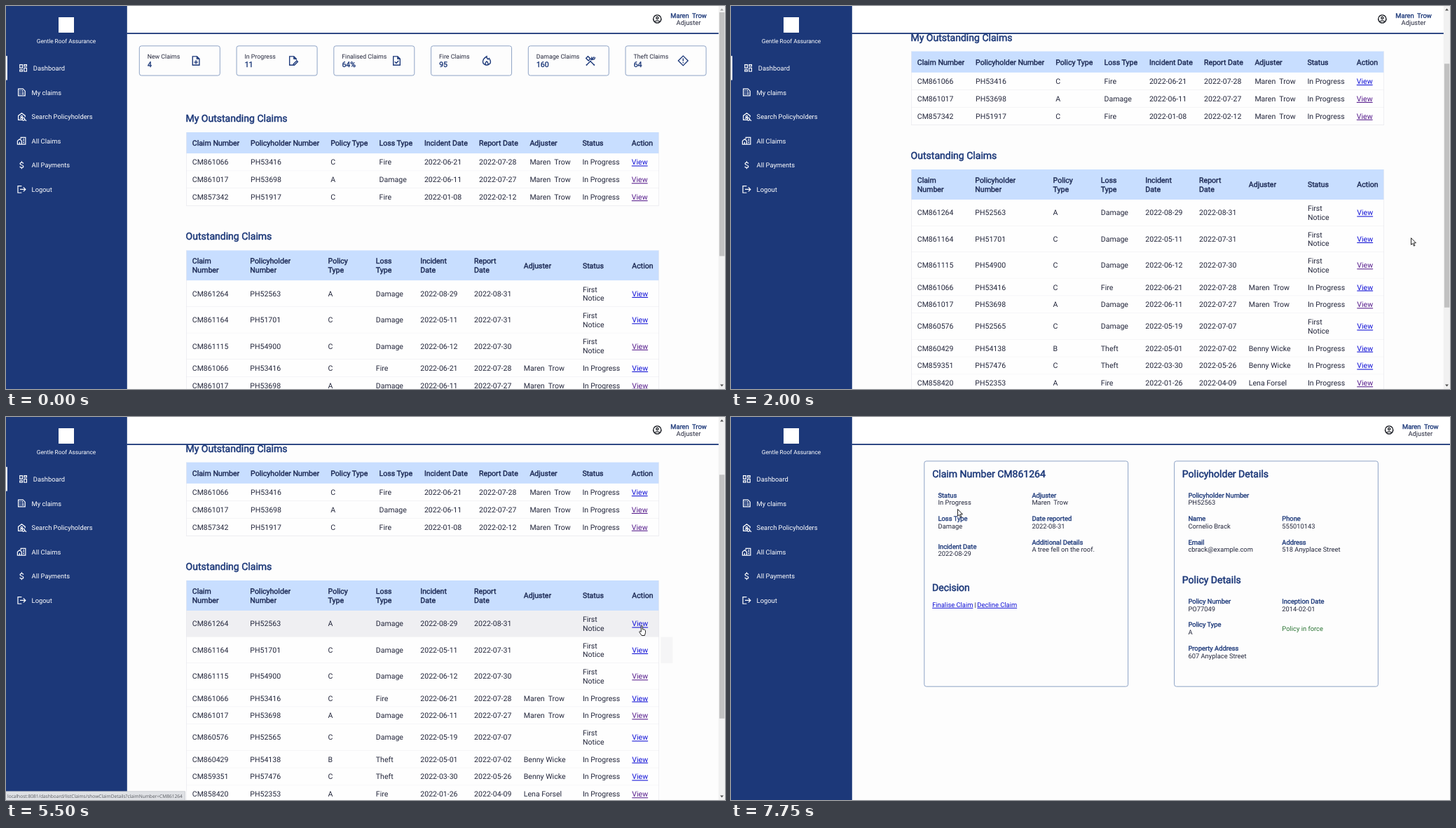
These frames come from a looping animation (1026x546 px, 8000 ms). An HTML page:

```html
<!DOCTYPE html>
<html lang="en">
<head>
<meta charset="utf-8">
<title>Claims dashboard</title>
<style>
html, body { margin: 0; width: 100%; height: 100%; overflow: hidden; background: #fdfdfd; }
svg { display: block; }
text { font-family: Roboto, sans-serif; text-rendering: geometricPrecision; white-space: pre; }
</style>
</head>
<body>
<svg id="stage" width="1026" height="546" viewBox="0 0 1026 546"></svg>
<script>
const NAVY = '#1c3879', INK = '#23263b', LINK = '#0f0fd6', SEEN = '#551a8b', EDGE = '#8fa4c6';
const SMALL = 9.36, BODY = 10.56, TITLE = 14.04;
const USER = 'Maren\u00a0 Trow';

// Text is placed by its left edge and the middle of its capitals.
function text(x, y, str, size = BODY, o = {}) {
  const fill = o.fill || INK;
  const bold = o.bold ? ` stroke="${fill}" stroke-width="${(size * .037).toFixed(2)}"` : '';
  const line = o.link ? ' text-decoration="underline"' : '';
  const anchor = o.mid ? ' text-anchor="middle"' : '';
  const font = o.font ? ` style="font-family:${o.font}"` : '';
  return `<text x="${x}" y="${(y + size * .356).toFixed(2)}" font-size="${size}" fill="${fill}"${bold}${line}${anchor}${font}>${str}</text>`;
}
const rect = (x, y, w, h, fill, extra = '') =>
  `<rect x="${x}" y="${y}" width="${w}" height="${h}" fill="${fill}" ${extra}/>`;
const frame = (x, y, w, h) => rect(x, y, w, h, '#fdfdfd', `rx="3" stroke="${EDGE}" stroke-width="1"`);
const group = (id, body) => `<g id="${id}">${body}</g>`;
// Icons use a 24-unit box centred on x, y.
const icon = (x, y, size, d, color, w = 2) =>
  `<path transform="translate(${x - size / 2} ${y - size / 2}) scale(${size / 24})" d="${d}" fill="none" stroke="${color}" stroke-width="${w}"/>`;

const SHEET = 'M14 3H5v18h14V8zM14 3v5h5';
const MENU = [
  ['Dashboard', 'M4 4h6v8H4zM14 4h6v4h-6zM14 12h6v8h-6zM4 16h6v4H4z'],
  ['My claims', 'M15 4H4v16h16V9zM7 8h2M7 12h2M7 16h2M12 8h3M12 12h5M12 16h5'],
  ['Search Policyholders', 'M14 20H4V10l8-6 8 6v3M12 10a2 2 0 1 0 .1 0M8 17q4-4 7 0M16 15a3 3 0 1 0 .1 0M19 19l4 3'],
  ['All Claims', 'M2 20V12l5-4 5 4v8zM7 20v-5M10 8V4h11v16h-9M15 8h3M15 12h3M15 16h3'],
  ['All Payments', 'M16 8.500q-.5-2.500-4-2.500t-4 2.700q0 2.300 4 3.200t4 3.400q0 2.700-4 2.700t-4-2.700M12 3v3M12 18v3'],
  ['Logout', 'M12 4H3v16h9M8 12h12M16 7l5 5-5 5']
];
const CARDS = [
  ['New Claims', '4', 80.8, SHEET + 'M8 15h8M12 11v8'],
  ['In Progress', '11', 80.4, 'M12 21H5V3h9l5 5v2M14 3v5h5M13 21v-2l7-7 2 2-7 7z'],
  ['Finalised Claims', '64%', 89.7, SHEET + 'M8 14l3 3 5-5'],
  ['Fire Claims', '95', 79.4, 'M12 3q0 5 3 6l2-2q3 4 3 7a8 7 0 0 1-16 0q0-6 8-11zM12 13q3 3 3 5a3 3 0 0 1-6 0q0-2 3-5'],
  ['Damage Claims', '160', 88.6, 'M4 21l9-9M20 21l-8-8M3 7l4-4 5 5-4 4zM14 10l6-6M15 4l-1 6 6-1 2-4M3 20l2 2M19 22l2-2'],
  ['Theft Claims', '64', 82.2, 'M12 2l10 10-10 10L2 12zM12 7v6M12 15v2']
];
const HEADS = ['Claim Number', 'Policyholder Number', 'Policy Type', 'Loss Type', 'Incident Date',
  'Report Date', 'Adjuster', 'Status', 'Action'];
const COLS1 = [265.8, 349.1, 463.2, 532.6, 596.9, 675.1, 747.4, 822.4, 892.8];
const COLS2 = [265.8, 348.3, 459.6, 527.8, 591.3, 668.1, 738.8, 822.9, 893.3];
// claim | holder | type | loss | incident | report | adjuster | link already visited
const CLAIMS = `CM861264|PH52563|A|Damage|2022-08-29|2022-08-31||
CM861164|PH51701|C|Damage|2022-05-11|2022-07-31||
CM861115|PH54900|C|Damage|2022-06-12|2022-07-30||y
CM861066|PH53416|C|Fire|2022-06-21|2022-07-28|${USER}|
CM861017|PH53698|A|Damage|2022-06-11|2022-07-27|${USER}|y
CM860576|PH52565|C|Damage|2022-05-19|2022-07-07||
CM860429|PH54138|B|Theft|2022-05-01|2022-07-02|Benny Wicke|
CM859351|PH57476|C|Theft|2022-03-30|2022-05-26|Benny Wicke|
CM858420|PH52353|A|Fire|2022-01-26|2022-04-09|Lena Forsel|y`.split('\n').map(r => r.split('|'));
const MINE = [CLAIMS[3], CLAIMS[4],
  ['CM857342', 'PH51917', 'C', 'Fire', '2022-01-08', '2022-02-12', USER, 'y']];

function twoLines(x, y, str, o) {
  const [a, b] = str.split(' ');
  return text(x, y - 6.3, a, BODY, o) + text(x, y + 6.4, b, BODY, o);
}

function table(top, headH, cols, rows, wrap) {
  const bold = { bold: true, fill: '#192650' };
  let out = rect(257, top, 674.8, headH, '#c8deff'), y = top + headH;
  HEADS.forEach((h, i) => {
    const draw = wrap && i < 6 ? twoLines : (x, yc, s, o) => text(x, yc, s, BODY, o);
    out += draw(cols[i], top + headH / 2, h, bold);
  });
  rows.forEach((r, n) => {
    const tall = !r[6], h = tall ? 37.45 : 24.83, mid = y + h / 2;
    out += rect(257, y, 674.8, h, '#fefefe', wrap ? `class="row" data-n="${n}"` : '');
    r.slice(0, 7).forEach((s, i) => { if (s) out += text(cols[i], mid, s); });
    out += tall ? twoLines(cols[7], mid, 'First Notice') : text(cols[7], mid, 'In Progress');
    out += text(cols[8], mid, 'View', BODY, { link: true, fill: r[7] ? SEEN : LINK });
    y += h;
    out += rect(257, y - .4, 674.8, .8, '#e9e9ee');
  });
  return out + rect(257, top, .7, y - top, '#e9e9ee') + rect(931.2, top, .7, y - top, '#e9e9ee');
}

function dashboard() {
  let out = '';
  CARDS.forEach(([label, value, dx, d], i) => {
    const x = 190.3 + 138.75 * i;
    out += frame(x, 56.9, 115, 42.2) + text(x + 11.4, 71.6, label, 8.78) +
      text(x + 11.6, 83.2, value, BODY, { bold: true, fill: NAVY }) + icon(x + dx, 78, 16.5, d, NAVY);
  });
  const head = { bold: true, fill: NAVY };
  return out + text(256.4, 160, 'My Outstanding Claims', TITLE, head) +
    table(180, 30.3, COLS1, MINE, false) +
    text(256.6, 328.4, 'Outstanding Claims', TITLE, head) +
    table(348.4, 43, COLS2, CLAIMS, true) +
    rect(934.3, 429, 17, 37.5, '#f5f5f6', 'id="patch"');
}

function details() {
  const title = (x, y, s) => text(x, y, s, TITLE, { bold: true, fill: NAVY });
  const field = (x, y, label, value) =>
    text(x, y, label, SMALL, { bold: true, fill: NAVY }) + text(x, y + 10.8, value, SMALL);
  const [a, b, c, d] = [295.5, 429.4, 652.4, 786.3];
  return frame(275.8, 62.9, 290.8, 321.3) + frame(632.6, 62.9, 290.8, 321.3) +
    title(287.2, 80.8, 'Claim Number CM861264') +
    field(a, 111.3, 'Status', 'In Progress') + field(b, 111.3, 'Adjuster', USER) +
    field(a, 144.9, 'Loss Type', 'Damage') + field(b, 144.9, 'Date reported', '2022-08-31') +
    field(a, 184.2, 'Incident Date', '2022-08-29') +
    field(b, 178.3, 'Additional Details', 'A tree fell on the roof.') +
    title(287, 243, 'Decision') +
    text(287.2, 267.6, 'Finalise Claim', SMALL, { link: true, fill: LINK }) +
    text(347.2, 267.6, '|', SMALL) +
    text(351.3, 267.6, 'Decline Claim', SMALL, { link: true, fill: LINK }) +
    title(643.8, 80.8, 'Policyholder Details') +
    field(c, 111.3, 'Policyholder Number', 'PH52563') +
    field(c, 144.9, 'Name', 'Cornelio Brack') + field(d, 144.9, 'Phone', '555010143') +
    field(c, 178.3, 'Email', 'cbrack@example.com') + field(d, 178.3, 'Address', '518 Anyplace Street') +
    title(643.8, 232.2, 'Policy Details') +
    field(c, 262.6, 'Policy Number', 'PO77049') + field(d, 262.6, 'Inception Date', '2014-02-01') +
    field(c, 296, 'Policy Type', 'A') + text(d, 301.6, 'Policy in force', SMALL, { fill: '#2b7434' }) +
    field(c, 329.6, 'Property Address', '607 Anyplace Street');
}

function header() {
  return rect(172.5, 0, 854, 38.2, '#fff') + rect(172.5, 38.2, 854, 1.8, NAVY) +
    group('user', icon(929.3, 18.6, 15,
      'M12 3a9 9 0 1 0 .1 0M12 7a2.500 2.500 0 1 0 .1 0M6 18q6-5 12 0', '#15181f') +
      text(974, 13.3, USER, SMALL, { bold: true, fill: NAVY, mid: true }) +
      text(974, 24, 'Adjuster', SMALL, { mid: true }));
}

function sidebar() {
  let out = rect(0, 0, 172.8, 546, NAVY) + rect(75, 16, 22, 22, '#fff') +
    text(86, 50.3, 'Gentle Roof Assurance', 8.3, { fill: '#fff', mid: true }) +
    rect(0, 71.2, 1.9, 34.4, '#fff', 'id="active"');
  MENU.forEach(([label, d], i) => {
    const y = 88.6 + 34.6 * i;
    out += group('menu' + i, icon(22.4, y - .2, 14.5, d, '#fff') +
      text(36.6, y, label, SMALL, { fill: '#fff' }));
  });
  return out;
}

const scrollbar = () => rect(1016.8, 0, 9.2, 546, '#f1f1f1') +
  rect(1017.9, 9, 7.4, 347.5, '#c1c1c1', 'id="thumb"') +
  '<path id="up" d="M1019 6.500h5l-2.500-3z"/><path d="M1019 539.500h5l-2.500 3z" fill="#505050"/>';

const status = () => rect(-1, 533.8, 256.6, 14, '#dfe1e5', 'stroke="#c3c6cb" stroke-width=".7"') +
  text(2, 540.2, 'localhost:8081/dashboard/listClaims/showClaimDetails?claimNumber=CM861264',
    6.6, { fill: '#55585d', font: "'Open Sans',sans-serif" });

const pointer = (id, d) =>
  `<path id="${id}" d="${d}" fill="#fff" stroke="#000" stroke-width=".85" stroke-linejoin="round"/>`;

const stage = document.getElementById('stage');
stage.innerHTML = rect(0, 0, 1026, 546, '#fdfdfd') +
  group('dash', dashboard()) + group('claim', details()) + header() + sidebar() +
  group('bar', scrollbar()) + group('status', status()) +
  pointer('arrow', 'M0 0V9.700L2.200 7.700 3.900 11.400 5.400 10.800 3.800 7.100H6.900z') +
  pointer('hand', 'M3 9V1.300a1 1 0 0 1 2 0V5.300l3.200.800q1 .300 1 1.400V10.500L8 14.300H3.800L.600 9.600q-.500-1 .600-1.400z');

const $ = id => document.getElementById(id);
const show = (id, on) => $(id).setAttribute('visibility', on ? 'visible' : 'hidden');
const move = (id, x, y) => $(id).setAttribute('transform', `translate(${x} ${y})`);

// Pointer stops: time, x, y
const PATH = [
  [500, 759, 318.5], [750, 885, 321], [1000, 968, 326], [1250, 997.5, 329], [1500, 970.5, 330.7],
  [2500, 926, 331], [2750, 842, 328], [3000, 745, 323], [3250, 655, 318], [3500, 594.5, 313],
  [3750, 676, 308], [4000, 757, 303], [4250, 823.2, 299.3], [4500, 872, 297.5], [4750, 903.3, 297.2],
  [6250, 903.5, 297.2], [6500, 868, 341], [6750, 559, 346], [7000, 491, 213], [7250, 465, 145],
  [7500, 385, 137], [7750, 323.5, 131.5]
];

function draw(ms) {
  const t = Math.floor(ms / 250) * 250;
  const onClaim = t >= 6000;
  const scroll = t < 1750 ? 0 : t < 2000 ? 50.9 : 115.4;
  const hover = t < 2500 || onClaim ? -1 : t < 3500 ? 1 : 0;

  show('dash', !onClaim);
  show('claim', onClaim);
  show('bar', !onClaim);
  show('active', !onClaim);
  move('dash', 0, -scroll);
  move('thumb', 0, scroll * .635);
  move('user', onClaim ? 9.8 : 0, 0);
  move('menu0', onClaim ? 0 : 2.2, 0);
  $('up').setAttribute('fill', scroll ? '#505050' : '#a3a3a3');
  document.querySelectorAll('.row').forEach(r =>
    r.setAttribute('fill', +r.dataset.n === hover ? '#efeff2' : '#fefefe'));
  $('patch').setAttribute('opacity', hover < 0 ? 0 : 1);
  show('status', t >= 5000 && t < 6250);

  const spot = PATH.filter(p => p[0] <= t).pop();
  const hand = t >= 4750 && t < 6250;
  show('arrow', spot && !hand);
  show('hand', hand);
  if (spot) move(hand ? 'hand' : 'arrow', spot[1], spot[2]);
}

const start = performance.now();
function tick() {
  draw((performance.now() - start) % 8000);
  requestAnimationFrame(tick);
}
draw(0);
requestAnimationFrame(tick);
</script>
</body>
</html>
```
